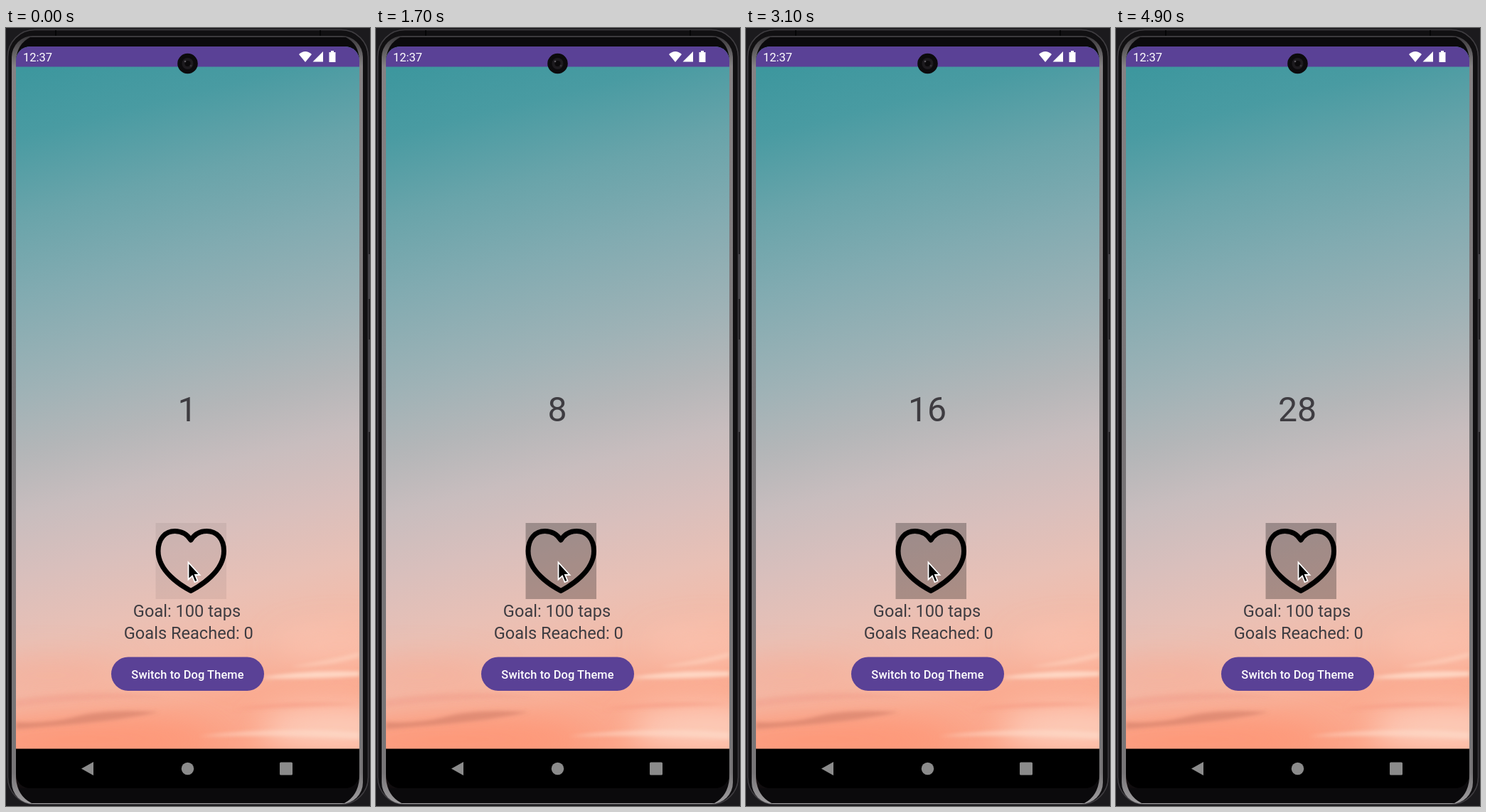
An HTML page that plays this animation: 512x1094 px, repeating every 5000 ms.

```html
<!DOCTYPE html>
<html lang="en">
<head>
<meta charset="utf-8">
<title>Tap counter</title>
<style>
  html, body { margin: 0; width: 100%; height: 100%; overflow: hidden; background: #1b1a1d; }
  svg { display: block; width: 512px; height: 1094px; }
  text { font-family: Roboto, sans-serif; fill: #3e3c41; }
  .mid { text-anchor: middle; }
  .light { fill: #fff; }
</style>
</head>
<body>
<svg viewBox="0 0 512 1094">
  <defs>
    <linearGradient id="sky" gradientUnits="userSpaceOnUse" x1="140" y1="30" x2="380" y2="990">
      <stop offset="0" stop-color="#3d979e"/>
      <stop offset=".09" stop-color="#499ba2"/>
      <stop offset=".2" stop-color="#69a4aa"/>
      <stop offset=".31" stop-color="#82abb1"/>
      <stop offset=".44" stop-color="#9eb2b6"/>
      <stop offset=".53" stop-color="#b4b6b8"/>
      <stop offset=".61" stop-color="#c8bdbe"/>
      <stop offset=".7" stop-color="#d9bfbc"/>
      <stop offset=".79" stop-color="#e9c0b5"/>
      <stop offset=".87" stop-color="#f4bba8"/>
      <stop offset=".94" stop-color="#faab91"/>
      <stop offset="1" stop-color="#fca488"/>
    </linearGradient>
    <linearGradient id="rim" x2="0" y2="1">
      <stop offset="0" stop-color="#3a383b"/>
      <stop offset=".04" stop-color="#858284"/>
      <stop offset=".5" stop-color="#777476"/>
      <stop offset=".96" stop-color="#777577"/>
      <stop offset="1" stop-color="#a09ea0"/>
    </linearGradient>
    <filter id="soft" x="-50%" y="-100%" width="200%" height="300%"><feGaussianBlur stdDeviation="22"/></filter>
    <filter id="wisp" x="-20%" y="-100%" width="140%" height="300%"><feGaussianBlur stdDeviation="2.5"/></filter>
    <clipPath id="screen"><rect x="14" y="26" width="483" height="1043" rx="20"/></clipPath>
  </defs>

  <!-- phone body -->
  <rect width="512" height="1094" fill="#1b1a1d"/>
  <rect x="2.500" y="2.500" width="507" height="1089" rx="38" fill="#111012" stroke="#403e42" stroke-width="1.500"/>
  <rect x="8" y="11" width="494" height="1080" rx="30" fill="url(#rim)"/>
  <path d="M14 45Q16 22 34 13H478Q496 22 497 45V1055Q495 1080 476 1090H36Q16 1080 14 1055Z" fill="#0b0a0c"/>
  <path d="M70 3V11M442 3V11" stroke="#050506" stroke-width="2"/>
  <path d="M511 318V381M511 438V568" stroke="#454348" stroke-width="3"/>

  <g clip-path="url(#screen)">
    <rect x="14" y="26" width="483" height="1000" fill="url(#sky)"/>
    <g filter="url(#soft)">
      <ellipse cx="110" cy="1000" rx="190" ry="34" fill="#ff8f6d" opacity=".65"/>
      <ellipse cx="60" cy="910" rx="110" ry="22" fill="#f9a58d" opacity=".5"/>
      <ellipse cx="465" cy="985" rx="110" ry="34" fill="#fdd6c6" opacity=".8"/>
      <ellipse cx="470" cy="870" rx="90" ry="24" fill="#fdcab8" opacity=".6"/>
    </g>
    <g filter="url(#wisp)">
      <path d="M14 976Q60 979 100 968T215 962Q160 973 105 978T14 986Z" fill="#d4806b" opacity=".65"/>
      <path d="M14 944Q110 928 230 941Q120 941 14 955Z" fill="#ee9380" opacity=".3"/>
      <path d="M355 914Q420 902 497 905V911Q430 916 355 914Z" fill="#ffdcca" opacity=".9"/>
      <path d="M400 898Q450 890 497 878V884Q455 898 400 898Z" fill="#ffd8c4" opacity=".55"/>
      <path d="M270 996Q380 981 497 990V1000Q390 994 270 996Z" fill="#ffdfcf" opacity=".5"/>
      <path d="M320 958Q400 943 497 951Q410 956 320 958Z" fill="#f59078" opacity=".4"/>
    </g>

    <rect x="14" y="26" width="483" height="28.500" fill="#5a4196"/>
    <rect x="14" y="1013.500" width="483" height="56"/>
  </g>

  <!-- status bar -->
  <text class="light" x="24" y="46.500" font-size="16.500">12:37</text>
  <g fill="#fff">
    <path d="M412 37Q421 29 430 37L421 48Z"/>
    <path d="M446 33V47.500H431.500Z"/>
    <path d="M454.500 34H457V32H461V34H463.500V48H454.500Z"/>
  </g>
  <circle cx="255.500" cy="50" r="14.300" fill="#0c0b0d"/>
  <circle cx="255.500" cy="50" r="8" fill="#1d1b1f"/>
  <circle cx="255.500" cy="50" r="4" fill="#0b0a0c"/>
  <circle cx="252" cy="47" r="1.300" fill="#5c595f"/>
  <circle cx="260" cy="53" r="1.500" fill="#373439"/>

  <text id="count" class="mid" x="255" y="553" font-size="48.200">1</text>

  <rect id="ripple" x="210.500" y="696" width="99.500" height="107"/>
  <path d="M260 791.500C246 784 214 764 214 735.500C214 718 224 707.500 237.500 707.500C248 707.500 255.500 713 260 720C264.500 713 272 707.500 282.500 707.500C296 707.500 306.500 718 306.500 735.500C306.500 764 274 784 260 791.500Z"
    fill="none" stroke="#000" stroke-width="7" stroke-linejoin="round"/>
  <path d="M256.500 751.500V775.500L262 770.500L265.500 779L269.500 777.500L266 769H272.500Z" stroke="#fff" stroke-width="1.800"/>

  <text class="mid" x="254.500" y="828" font-size="23.600">Goal: 100 taps</text>
  <text class="mid" x="256.800" y="859" font-size="23.600">Goals Reached: 0</text>
  <rect x="148" y="884.500" width="215" height="47.500" rx="23.750" fill="#5a4196"/>
  <text class="mid light" x="255.500" y="915" font-size="16.400" font-weight="500" letter-spacing=".12">Switch to Dog Theme</text>

  <!-- navigation bar -->
  <g fill="#8b8b8b">
    <path d="M106 1041.500L123 1032V1051Z"/>
    <circle cx="255.500" cy="1041.500" r="8.700"/>
    <rect x="385" y="1032.500" width="18" height="18" rx="1.500"/>
  </g>
</svg>
<script>
  const LOOP = 5000, STEP = 100;
  // [time in ms, value] pairs, linear in between
  const TAPS = [[0, 1], [1000, 4], [1700, 8], [2600, 13], [3600, 20], [4300, 24], [4900, 28], [5000, 28]];
  const SHADE = [[0, .06], [200, .16], [700, .26], [5000, .27]];
  const count = document.getElementById("count");
  const ripple = document.getElementById("ripple");

  function valueAt(table, time) {
    const next = table.findIndex(([t]) => t > time);
    const [t0, v0] = table[next - 1], [t1, v1] = table[next];
    return v0 + (v1 - v0) * (time - t0) / (t1 - t0);
  }

  function draw() {
    const time = Math.floor(performance.now() % LOOP / STEP) * STEP;
    const label = String(Math.floor(valueAt(TAPS, time) + 1e-6));
    if (count.textContent !== label) count.textContent = label;
    ripple.setAttribute("fill-opacity", valueAt(SHADE, time).toFixed(3));
    requestAnimationFrame(draw);
  }
  draw();
</script>
</body>
</html>
```
